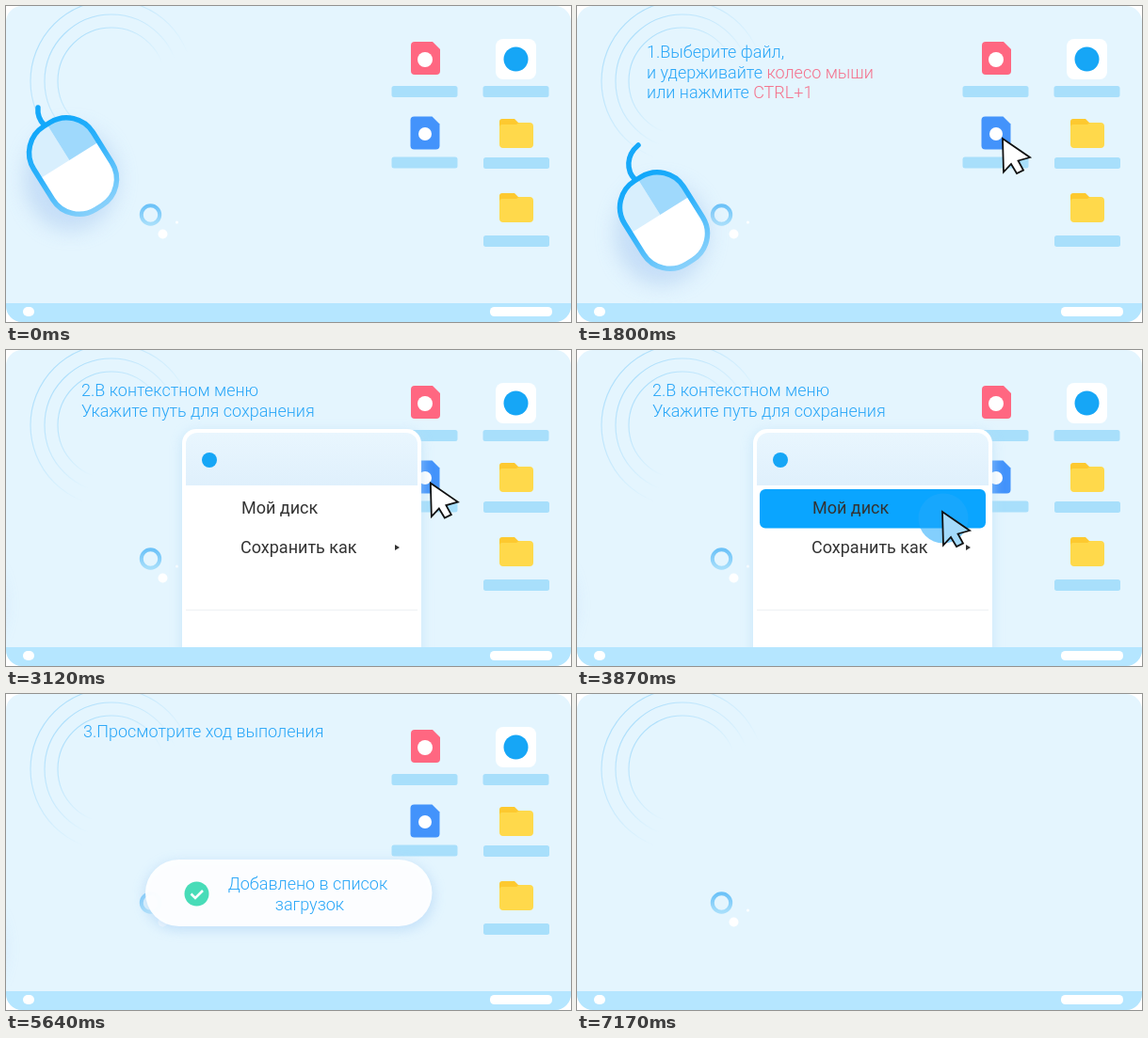
Animation, 600 px wide and 336 px high, one loop 7200 ms. Source, as an HTML page:

```html
<!DOCTYPE html>
<html lang="ru">
<head>
<meta charset="utf-8">
<style>
  html, body { margin: 0; width: 100%; height: 100%; overflow: hidden; background: #fff; }
  svg { display: block; width: 600px; height: 336px; }
  text { font: 300 18px Roboto, sans-serif; fill: #2aa7f8; white-space: pre; }
  .hot { fill: #f4728d; }
  .dark { fill: #333; font-weight: 400; }
  .bar { fill: #a8dffb; }
</style>
</head>
<body>
<svg viewBox="0 0 600 336">
  <defs>
    <clipPath id="stage"><rect width="600" height="336" rx="17"/></clipPath>
    <clipPath id="body"><rect x="-37" y="-52" width="74" height="104" rx="33"/></clipPath>
    <linearGradient id="arc" x1="0" y1="0.1" x2="0.8" y2="0.9">
      <stop stop-color="#a6dcfb"/><stop offset=".75" stop-color="#a6dcfb" stop-opacity="0"/>
    </linearGradient>
    <linearGradient id="rim" x1="0" y1="0" x2="0" y2="1">
      <stop stop-color="#12a8fa"/><stop offset=".45" stop-color="#2fb2fb"/><stop offset="1" stop-color="#86d0fb"/>
    </linearGradient>
    <linearGradient id="ring" x1="0" y1="0" x2="0" y2="1">
      <stop stop-color="#6cc2f8"/><stop offset="1" stop-color="#a6defb"/>
    </linearGradient>
    <linearGradient id="head" x1="0" y1="0" x2="0" y2="1">
      <stop stop-color="#e9f6fe"/><stop offset="1" stop-color="#dff0fc"/>
    </linearGradient>
    <filter id="blur" x="-50%" y="-50%" width="200%" height="200%"><feGaussianBlur stdDeviation="10"/></filter>
    <filter id="soft" x="-20%" y="-40%" width="140%" height="180%"><feGaussianBlur stdDeviation="6"/></filter>
    <path id="page" d="M4 0H23L31 8V31a4 4 0 0 1-4 4H4a4 4 0 0 1-4-4V4a4 4 0 0 1 4-4Z"/>
    <g id="folder">
      <path d="M3 0H16l4 4H30V12H0V3a3 3 0 0 1 3-3Z" fill="#fdc92f"/>
      <path d="M0 9a3 3 0 0 1 3-3H18l3-2H32a4 4 0 0 1 4 4V27a4 4 0 0 1-4 4H4a4 4 0 0 1-4-4Z" fill="#ffd94b"/>
    </g>
  </defs>

  <g clip-path="url(#stage)">
    <rect width="600" height="336" fill="#e4f5fe"/>
    <g fill="none" stroke="url(#arc)" stroke-width="1.2">
      <circle cx="112" cy="80" r="86"/><circle cx="112" cy="80" r="71"/><circle cx="112" cy="80" r="57"/>
    </g>
    <circle cx="153.5" cy="222" r="9.7" fill="none" stroke="url(#ring)" stroke-width="4"/>
    <g fill="#fff"><circle cx="166.500" cy="242.500" r="5"/><circle cx="181.500" cy="230" r="1.500"/></g>

    <g id="scene">
      <g class="bar">
        <rect x="409.500" y="85" width="70" height="12" rx="2.500"/>
        <rect x="506.500" y="85" width="70" height="12" rx="2.500"/>
        <rect x="409.500" y="160.500" width="70" height="12" rx="2.500"/>
        <rect x="507" y="161" width="70" height="12" rx="2.500"/>
        <rect x="507" y="244" width="70" height="12" rx="2.500"/>
      </g>
      <use href="#page" x="430" y="38" fill="#ff6781"/>
      <circle cx="445" cy="57" r="8" fill="#fff"/>
      <use href="#page" x="429.500" y="117.500" fill="#4393fb"/>
      <circle cx="445" cy="136" r="7" fill="#fff"/>
      <rect x="520" y="35" width="43" height="43" rx="8" fill="#fff"/>
      <circle cx="541.500" cy="56.500" r="13" fill="#16a6f6"/>
      <use href="#folder" x="524" y="120"/>
      <use href="#folder" x="524" y="199"/>

      <g id="mouse">
        <ellipse cx="-2" cy="14" rx="50" ry="55" fill="#b4d0f3" opacity=".62" filter="url(#blur)"/>
        <path id="tail" d="M-30-43C-40-53-40-69-27-80" pathLength="1" fill="none" stroke="#16a9fa" stroke-width="5.500" stroke-linecap="round"/>
        <g transform="rotate(-32)">
          <g clip-path="url(#body)">
            <rect x="-40" y="-55" width="80" height="110" fill="#fff"/>
            <rect x="-40" y="-55" width="40" height="48" fill="#d8effd"/>
            <rect y="-55" width="40" height="48" fill="#9fd9fc"/>
          </g>
          <rect x="-37" y="-52" width="74" height="104" rx="33" fill="none" stroke="url(#rim)" stroke-width="5.500"/>
        </g>
      </g>

      <g id="step1">
        <text x="74" y="55">1.Выберите файл,</text>
        <text x="74" y="77">и удерживайте <tspan class="hot">колесо мыши</tspan></text>
        <text x="74" y="98">или нажмите <tspan class="hot">CTRL+1</tspan></text>
      </g>
      <g id="step2">
        <text x="80" y="49">2.В контекстном меню</text>
        <text x="80" y="71">Укажите путь для сохранения</text>
      </g>
      <text id="step3" x="82" y="46">3.Просмотрите ход выполения</text>

      <g id="menu">
        <rect x="186" y="86" width="256" height="270" rx="16" fill="#b9dff8" opacity=".6" filter="url(#soft)"/>
        <rect x="187" y="84" width="254" height="270" rx="15" fill="#fff"/>
        <path d="M191 144V100a12 12 0 0 1 12-12H425a12 12 0 0 1 12 12V144Z" fill="url(#head)"/>
        <circle cx="216" cy="117" r="8" fill="#16a6f6"/>
        <rect id="row" x="194" y="148" width="240" height="41.500" rx="6" fill="#0aa5ff"/>
        <text class="dark" x="250" y="174">Мой диск</text>
        <text class="dark" x="249" y="216">Сохранить как</text>
        <path d="M413 207l5 3-5 3Z" fill="#333"/>
        <path d="M191 276.500H437" stroke="#eef1f3"/>
      </g>

      <g id="toast">
        <rect x="146" y="178" width="309" height="74" rx="37" fill="#bcdcf8" opacity=".75" filter="url(#soft)"/>
        <rect x="148" y="176" width="304.500" height="71" rx="35.500" fill="#fff" opacity=".94"/>
        <circle cx="202.500" cy="212.500" r="13" fill="#48dcb8"/>
        <path d="M196.500 212.500l4.500 4.500 8-8" fill="none" stroke="#fff" stroke-width="2.500"/>
        <text x="320.500" y="208" text-anchor="middle">Добавлено в список</text>
        <text x="322.500" y="230" text-anchor="middle">загрузок</text>
      </g>

      <g id="pointer">
        <circle id="ripple" cx="1" cy="7" fill="#22a9fb"/>
        <path id="arrow" d="M0 0L1 35.500 9 27 15 37 22 33.500 16.500 23.500 29 20Z" stroke="#111" stroke-width="1.800"/>
      </g>
    </g>

    <rect y="316" width="600" height="20" fill="#b5e6ff"/>
    <rect x="18" y="320" width="12" height="10" rx="5" fill="#fff"/>
    <rect x="514" y="320" width="66" height="10" rx="4.500" fill="#fff"/>
  </g>
</svg>
<script>
  const LOOP = 7200, STEP = 30;
  const $ = id => document.getElementById(id);
  const ramp = (t, from, to) => Math.min(1, Math.max(0, (t - from) / (to - from)));
  const inOut = p => p < .5 ? 2 * p * p : 1 - 2 * (1 - p) ** 2;
  const out = p => 1 - (1 - p) ** 3;
  const move = (id, x, y) => $(id).setAttribute('transform', `translate(${x} ${y})`);
  const fade = (id, a) => $(id).setAttribute('opacity', a);

  function moveMouse(t) {
    const enter = out(ramp(t, 0, 780)), settle = inOut(ramp(t, 780, 1300)), leave = ramp(t, 2346, 3012);
    move('mouse', 71 + 19 * enter + 2 * settle - 147 * inOut(leave),
                  170 + 55 * enter + 3 * settle + 28.5 * out(leave));
    $('tail').setAttribute('stroke-dasharray', `${.5 + .5 * ramp(t, 0, 240)} 2`);
  }

  function movePointer(t) {
    const enter = out(ramp(t, 150, 750)), go = inOut(ramp(t, 3060, 3690));
    move('pointer', 452 - 64 * go + 60 * (1 - enter), 141 + 31 * go + 110 * (1 - enter));
    fade('pointer', ramp(t, 120, 300) * (1 - ramp(t, 4530, 4740)));
    const click = ramp(t, t < 3000 ? 780 : 3750, t < 3000 ? 1180 : 4150);
    $('ripple').setAttribute('r', 52 * (1 - (1 - click) ** 2));
    fade('ripple', click ? .8 * (1 - click) : 0);
    $('arrow').setAttribute('fill', t >= 3780 && t < 4150 ? '#a3dafb' : '#fff');
  }

  function draw(t) {
    moveMouse(t);
    movePointer(t);
    fade('step1', ramp(t, 90, 480) * (1 - ramp(t, 2580, 2790)));
    fade('step2', ramp(t, 2790, 3060) * (1 - ramp(t, 4620, 4860)));
    fade('step3', ramp(t, 4890, 5250));
    move('menu', 0, 265 * (1 - out(ramp(t, 2580, 3120)) + inOut(ramp(t, 4560, 5070))));
    fade('row', t >= 3780 ? 1 : 0);
    move('toast', 0, 170 * (1 - out(ramp(t, 5070, 5580))));
    fade('toast', ramp(t, 5070, 5400));
    fade('scene', 1 - ramp(t, 6780, 7140));
  }

  const start = performance.now();
  function tick() {
    const t = (performance.now() - start) % LOOP;
    draw(Math.floor(t / STEP) * STEP);
    requestAnimationFrame(tick);
  }
  tick();
</script>
</body>
</html>
```
